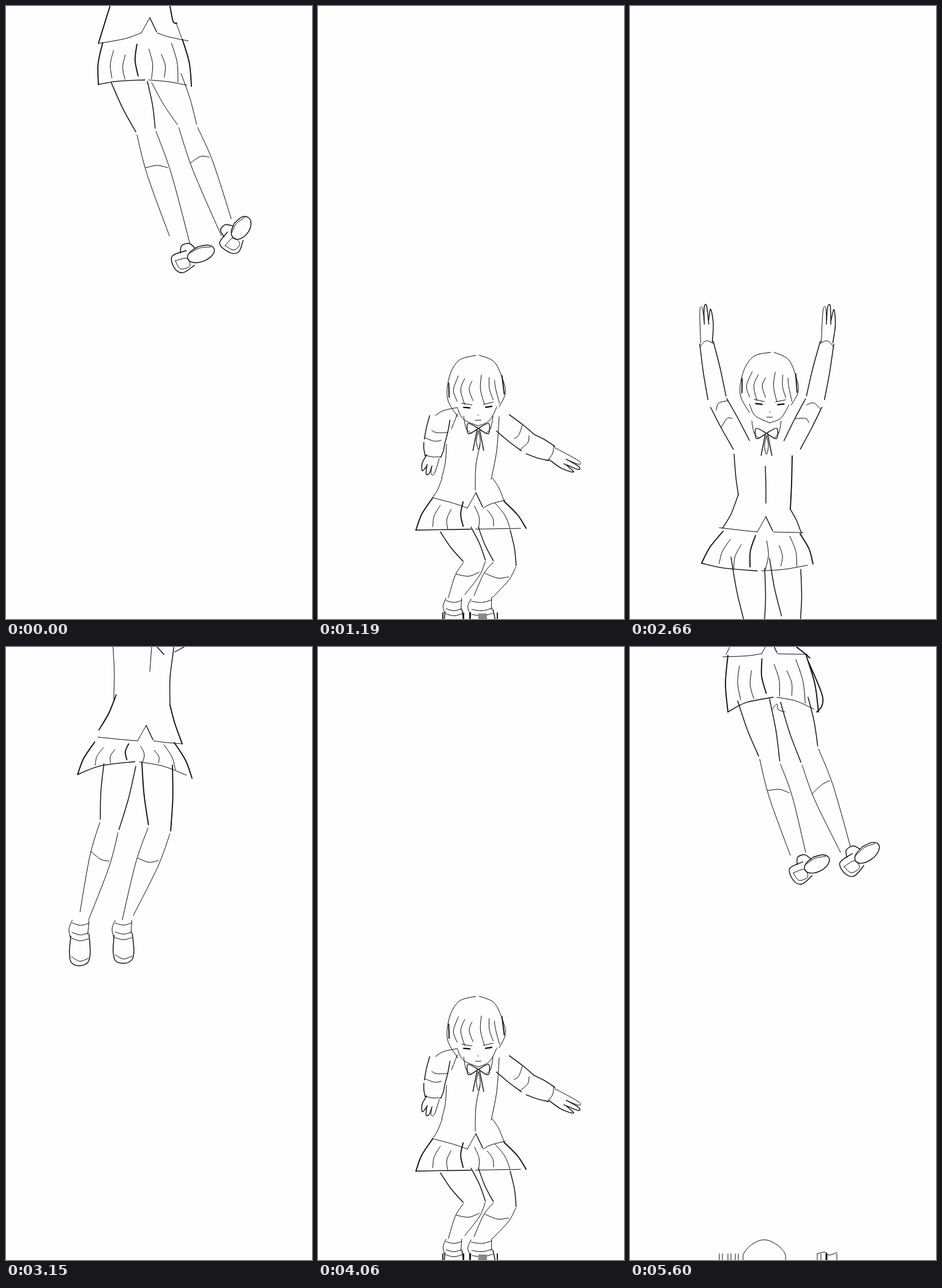
Write an HTML page with a canvas that moves like this. It is 500 by 1000 pixels and loops after 5670 ms.

```html
<!DOCTYPE html>
<html lang="en">
<head>
<meta charset="utf-8">
<title>Falling figure</title>
<style>
html, body { margin: 0; width: 100%; height: 100%; overflow: hidden; background: #fefefe; }
canvas { display: block; width: 100%; height: 100%; }
</style>
</head>
<body>
<canvas id="stage" width="500" height="1000"></canvas>
<script>
const ctx = document.getElementById('stage').getContext('2d');
const FINE = 1, MID = 1.4, BOLD = 1.8;
const mix = (a, b, t) => a + (b - a) * t;

// Smooth stroke through the given x, y pairs.
function ink(width, ...n) {
  const last = n.length / 2 - 1;
  const at = (i, k) => n[2 * Math.max(0, Math.min(last, i)) + k];
  ctx.lineWidth = width;
  ctx.beginPath();
  ctx.moveTo(n[0], n[1]);
  for (let i = 0; i < last; i++) {
    const out = k => at(i, k) + (at(i + 1, k) - at(i - 1, k)) / 6;
    const back = k => at(i + 1, k) - (at(i + 2, k) - at(i, k)) / 6;
    ctx.bezierCurveTo(out(0), out(1), back(0), back(1), at(i + 1, 0), at(i + 1, 1));
  }
  ctx.stroke();
}

// Pen working in a local frame: u runs across (in widths), v along the axis from 0 to 1.
function penOn(x0, y0, x1, y1, size) {
  const ax = x1 - x0, ay = y1 - y0, k = size / Math.hypot(ax, ay);
  return (width, ...uv) => {
    const points = [];
    for (let i = 0; i < uv.length; i += 2) {
      const u = uv[i], v = uv[i + 1];
      points.push(x0 + ax * v + ay * k * u, y0 + ay * v - ax * k * u);
    }
    ink(width, ...points);
  };
}

function bars(width, ...xs) {
  for (const x of xs) ink(width, x, 990, x, 1000);
}

// Each side of a leg is hip, knee, ankle.
function leg(left, right, weight = MID, sag = 5) {
  const sides = [[left, -1], [right, 1]];
  for (const [[hx, hy, kx, ky, ax, ay], out] of sides) {
    penOn(hx, hy, kx, ky, 1)(weight, 0, 0, out * 2, 0.5, 0, 0.98);
    penOn(kx, ky, ax, ay, 1)(FINE, 0, 0.02, out * 4, 0.4, 0, 1);
  }
  const [lx, ly, rx, ry] = [left, right].flatMap(s => [mix(s[2], s[4], 0.34), mix(s[3], s[5], 0.34)]);
  ink(FINE, lx - 4, ly, (lx + rx) / 2, (ly + ry) / 2 + sag, rx + 1, ry);
}

function skirt(x0, y0, x1, y1, x2, y2, x3, y3, sag) {
  const pleats = 7;
  for (let i = 0; i <= pleats; i++) {
    const t = i / pleats, edge = i % pleats === 0;
    const top = mix(x0, x1, t), topY = mix(y0, y1, t);
    const low = mix(x2, x3, t), lowY = mix(y2, y3, t) + sag * 4 * t * (1 - t);
    const start = edge ? 0 : 0.08 + 0.13 * (i % 3), end = edge ? 1 : 0.97 - 0.07 * (i % 2);
    const middle = (start + end) / 2, bow = (t < 0.5 ? -1 : 1) * 4;
    ink(edge || i === 3 ? BOLD : FINE,
      mix(top, low, start), mix(topY, lowY, start),
      mix(top, low, middle) + bow, mix(topY, lowY, middle),
      mix(top, low, end), mix(topY, lowY, end));
  }
  const hem = t => [mix(x2, x3, t), mix(y2, y3, t) + sag * 4 * t * (1 - t)];
  ink(MID, ...hem(0), ...hem(0.2), ...hem(0.5));
  ink(FINE, ...hem(0.54), ...hem(0.75), ...hem(0.95));
}

// Lower edge of the blouse with its notch in the middle.
function blouseHem(lx, ly, nx, ny, rx, ry) {
  const base = ny + 25;
  ink(FINE, lx, ly, (lx + nx) / 2, (ly + base) / 2 + 1, nx - 14, base);
  ink(FINE, nx - 14, base, nx, ny);
  ink(MID, nx, ny, nx + 11, base - 2);
  ink(FINE, nx + 12, base, (nx + rx) / 2, (base + ry) / 2, rx, ry);
}

function toeShoe(...axis) {
  const pen = penOn(...axis);
  pen(MID, -0.45, 0.35, -0.5, 0.7, -0.4, 0.93, 0, 1, 0.4, 0.92, 0.5, 0.7, 0.42, 0.3);
  pen(FINE, -0.4, 0.8, 0, 0.9, 0.42, 0.83);
  for (const v of [0.06, 0.27, 0.4]) pen(FINE, -0.4, v, 0, v + 0.05, 0.4, v);
  pen(FINE, -0.4, 0, -0.55, 0.2, -0.45, 0.42);
  pen(FINE, 0.4, 0, 0.36, 0.3);
}

function soleShoe(...axis) {
  const pen = penOn(...axis), rim = [];
  for (let i = 0; i <= 8; i++) rim.push(0.42 * Math.cos(i * Math.PI / 4), 0.68 + 0.32 * Math.sin(i * Math.PI / 4));
  pen(MID, ...rim);
  pen(MID, 0.45, 0.4, 0.45, 0.05, -0.2, 0, -0.6, 0.14, -0.45, 0.45);
  pen(FINE, 0.15, 0.08, 0.05, 0.35, -0.4, 0.34, -0.35, 0.12, 0.15, 0.08);
  pen(MID, 0.45, 0.25, 0.8, 0.34, 0.75, 0.52, 0.4, 0.6);
  pen(FINE, 0.25, 0.45, 0.32, 0.7, 0.15, 0.95);
}

// Axis runs from the crown to the chin.
function head(...axis) {
  const pen = penOn(...axis);
  pen(FINE, -0.36, 0.86, -0.53, 0.6, -0.48, 0.28, -0.3, 0.06, 0, 0);
  pen(FINE, 0.06, 0, 0.32, 0.1, 0.46, 0.35, 0.5, 0.55, 0.38, 0.74);
  pen(BOLD, -0.5, 0.38, -0.5, 0.58);
  pen(BOLD, 0.45, 0.3, 0.48, 0.56);
  [-0.38, -0.25, -0.1, 0.1, 0.26, 0.37].forEach((u, i) =>
    pen(FINE, u * 0.85, 0.28 + 0.04 * (i % 3), u - 0.04, 0.48, u + 0.02, 0.64 + 0.05 * (i % 2)));
  pen(FINE, -0.36, 0.74, -0.26, 0.9, 0, 1);
  pen(FINE, 0, 1, 0.2, 0.93, 0.34, 0.74);
  for (const side of [-1, 1]) {
    pen(2.2, side * 0.14, 0.74, side * 0.25, 0.73);
    pen(FINE, side * 0.1, 0.7, side * 0.28, 0.67);
  }
  pen(FINE, 0, 0.84, 0.01, 0.85);
  pen(FINE, -0.05, 0.92, 0.05, 0.92);
}

function neckBow(x, y) {
  const pen = penOn(x, y, x, y + 40, 40);
  for (const side of [-1, 1]) {
    pen(FINE, side * 0.6, -0.5, side * 0.5, 0, side * 0.3, 0.2);
    pen(MID, 0, 0, side * 0.42, -0.2, side * 0.4, 0.22, 0, 0);
    pen(MID, side * 0.05, 0.05, side * 0.12, 0.4, side * 0.22, 0.9);
    pen(FINE, 0, 0.1, side * 0.08, 0.5, side * 0.02, 0.85);
  }
}

// Sleeve from shoulder over elbow to wrist, then the hand to its tip.
function arm(sx, sy, ex, ey, wx, wy, tx, ty, size = 34) {
  const upper = penOn(sx, sy, ex, ey, size), lower = penOn(ex, ey, wx, wy, size);
  for (const side of [-0.5, 0.5]) {
    upper(MID, side, 0, side * 1.05, 0.5, side, 0.95);
    lower(MID, side, 0.05, side * 0.95, 0.5, side * 0.75, 1);
  }
  upper(FINE, 0.5, 0.5, 0, 0.6, -0.25, 0.55);
  upper(FINE, -0.5, 0.9, 0, 0.95, 0.3, 0.85);
  lower(FINE, -0.4, 0.95, 0, 1.03, 0.4, 0.95);
  const hand = penOn(wx, wy, tx, ty, size * 0.7);
  hand(MID, -0.45, 0, -0.6, 0.5, -0.45, 0.9, -0.25, 0.6);
  hand(MID, -0.25, 0.5, -0.15, 1, 0.05, 0.95, 0.1, 0.5);
  hand(FINE, 0.1, 0.6, 0.2, 0.95, 0.4, 0.85, 0.45, 0);
}

const drawings = {
  hang() {
    ink(BOLD, 170, 0, 160, 32, 151, 61);
    ink(BOLD, 268, 0, 273, 25, 279, 28);
    ink(FINE, 278, 28, 287, 52);
    blouseHem(152, 61, 235, 19, 298, 57);
    skirt(158, 60, 288, 54, 151, 128, 303, 131, -9);
    leg([172, 125, 213, 207, 267, 375], [231, 123, 244, 201, 300, 386], MID, -4);
    leg([238, 125, 281, 195, 352, 375], [286, 110, 312, 195, 368, 347], FINE, -6);
    soleShoe(273, 422, 340, 396, 30);
    soleShoe(359, 398, 396, 345, 32);
  },
  drop() {
    ink(FINE, 175, -60, 175, 0, 177, 40, 176, 85);
    ink(BOLD, 180, 78, 168, 108, 152, 135);
    ink(MID, 274, -40, 274, 0, 268, 50, 268, 95);
    ink(BOLD, 268, 95, 276, 125, 288, 158);
    ink(FINE, 238, 0, 235, 40);
    ink(MID, 247, 0, 258, 12);
    ink(MID, 276, 8, 291, 0);
    blouseHem(150, 147, 229, 128, 288, 158);
    skirt(145, 155, 275, 156, 117, 208, 304, 214, -24);
    leg([160, 190, 154, 283, 121, 432], [212, 195, 184, 300, 135, 445]);
    leg([222, 188, 233, 292, 190, 445], [272, 193, 269, 302, 208, 438], BOLD);
    toeShoe(122, 446, 120, 520, 34);
    toeShoe(192, 446, 192, 516, 34);
  },
  fall() {
    head(230, -74, 228, 41, 92);
    neckBow(223, 58);
    arm(182, 77, 143, 5, 125, -90, 122, -150, 30);
    arm(265, 77, 302, 5, 322, -90, 324, -150, 30);
    ink(MID, 170, 92, 173, 130, 177, 158);
    ink(MID, 177, 158, 165, 190, 151, 213);
    ink(BOLD, 265, 95, 264, 140, 262, 182);
    ink(MID, 262, 182, 272, 200, 280, 221);
    ink(MID, 221, 112, 222, 140, 222, 172);
    blouseHem(146, 212, 222, 194, 283, 220);
    skirt(152, 218, 278, 222, 117, 270, 299, 271, 12);
    leg([165, 260, 188, 371, 130, 522], [220, 278, 219, 376, 140, 527]);
    leg([228, 262, 248, 358, 219, 520], [279, 280, 278, 370, 230, 520]);
    toeShoe(138, 522, 118, 589, 34);
    toeShoe(225, 522, 241, 584, 32);
  },
  land() {
    head(258, 570, 262, 685, 92);
    neckBow(262, 689);
    ink(FINE, 228, 655, 205, 660, 192, 668);
    arm(199, 672, 190, 712, 188, 735, 180, 764);
    arm(302, 680, 345, 714, 382, 730, 427, 753);
    ink(FINE, 228, 665, 218, 690);
    ink(FINE, 210, 715, 208, 745, 202, 770);
    ink(FINE, 203, 770, 195, 790, 187, 802);
    ink(FINE, 296, 670, 292, 725, 283, 772);
    ink(FINE, 285, 770, 295, 785, 304, 807);
    ink(FINE, 265, 715, 258, 750, 257, 790);
    blouseHem(187, 802, 258, 794, 306, 806);
    skirt(187, 803, 304, 808, 160, 855, 340, 852, 0);
    leg([200, 858, 238, 907, 213, 965], [250, 850, 274, 905, 240, 960]);
    leg([262, 850, 287, 906, 255, 962], [314, 855, 324, 914, 285, 965]);
    toeShoe(222, 966, 222, 1030, 32);
    toeShoe(267, 966, 271, 1030, 42);
    bars(BOLD, 204, 238, 248, 293);
    ctx.fillStyle = '#888';
    ctx.fillRect(262, 991, 14, 9);
  },
  crouch() {
    head(240, 765, 246, 864, 84);
    neckBow(241, 872);
    ink(FINE, 200, 838, 187, 845);
    ink(FINE, 275, 838, 297, 858);
    arm(192, 856, 160, 922, 182, 978, 188, 1008);
    arm(291, 860, 309, 920, 330, 975, 338, 1008);
    ink(FINE, 190, 902, 215, 905, 248, 906);
    ink(FINE, 188, 905, 210, 930, 235, 920);
    skirt(184, 915, 240, 925, 178, 945, 236, 970, 10);
    ink(MID, 228, 960, 238, 935, 248, 910, 270, 899, 293, 912, 296, 935, 285, 955, 262, 985);
    ink(FINE, 285, 905, 260, 912, 251, 930, 255, 950, 272, 957, 288, 950, 296, 930);
    ink(MID, 232, 985, 238, 967, 258, 975);
    ink(FINE, 242, 985, 255, 982, 268, 985);
    bars(MID, 205, 211, 222, 228, 240, 269, 312, 318, 345, 358);
    ctx.fillStyle = '#111';
    ctx.fillRect(244, 991, 20, 9);
  },
  apex() {
    ink(FINE, 163, 0, 157, 12);
    ink(BOLD, 272, 0, 285, 10, 294, 18);
    blouseHem(152, 16, 229, -14, 290, 12);
    skirt(160, 14, 288, 14, 160, 106, 308, 106, -24);
    ink(BOLD, 292, 25, 313, 75, 314, 95, 305, 106);
    ink(FINE, 232, 102, 240, 93, 242, 102, 253, 106);
    leg([176, 88, 211, 180, 262, 340], [228, 85, 245, 188, 287, 335], MID, -4);
    leg([246, 90, 280, 190, 344, 335], [291, 82, 307, 163, 360, 325], MID, -4);
    soleShoe(264, 375, 325, 344, 30);
    soleShoe(348, 365, 406, 322, 30);
  },
  exit() {
    ink(FINE, 185, 1000, 186, 989, 200, 974, 220, 967, 240, 975, 253, 989, 254, 1000);
    bars(FINE, 146, 151, 160, 165, 172, 177, 306, 312, 338);
    bars(3, 321);
    ink(FINE, 306, 990, 318, 987, 325, 992, 338, 988);
  }
};

function show(name, { down = 0, turn = 0, stretch = 1, opacity = 1 } = {}) {
  ctx.save();
  ctx.globalAlpha = opacity;
  ctx.translate(220, down + 1000 * (1 - stretch) + 60 * stretch);
  ctx.scale(1, stretch);
  ctx.rotate(turn * Math.PI / 180);
  ctx.translate(-220, -60);
  drawings[name]();
  ctx.restore();
}

function pose(step) {
  const n = step - 4;
  if (step < 2) show('hang', { down: 18 * step, turn: 9 * step });
  else if (step < 7) show('drop', { down: 14 * n, turn: n < 0 ? 6 * n : 3 * n });
  else if (step < 9) show('fall', { down: 22 * (step - 8), turn: 5 * (8 - step) });
  else if (step < 13) show('fall', { down: 152 + 81 * (step - 9) });
  else if (step < 18) show('land', { stretch: 1 + 0.025 * Math.max(0, 17 - step) ** 2 });
  else if (step < 30) show('crouch', { stretch: 1 + 0.017 * Math.max(0, 22 - step) ** 2 });
  else if (step < 32) show('crouch', { opacity: (32 - step) / 3 });
  else if (step > 34 && step < 39) show('fall', { down: 353 * (step - 35) - 420 });
  else if (step > 38) show('apex', { down: 25 * (step - 39) });
  if (step === 39) show('exit');
}

const STEP_MS = 70, CYCLE = 41, LOOP = 81;
const start = performance.now();

function draw() {
  const tick = Math.floor((performance.now() - start) / STEP_MS) % LOOP;
  ctx.fillStyle = '#fefefe';
  ctx.fillRect(0, 0, 500, 1000);
  ctx.strokeStyle = '#0c0c0c';
  ctx.lineCap = ctx.lineJoin = 'round';
  pose(tick % CYCLE);
  requestAnimationFrame(draw);
}
draw();
</script>
</body>
</html>
```
